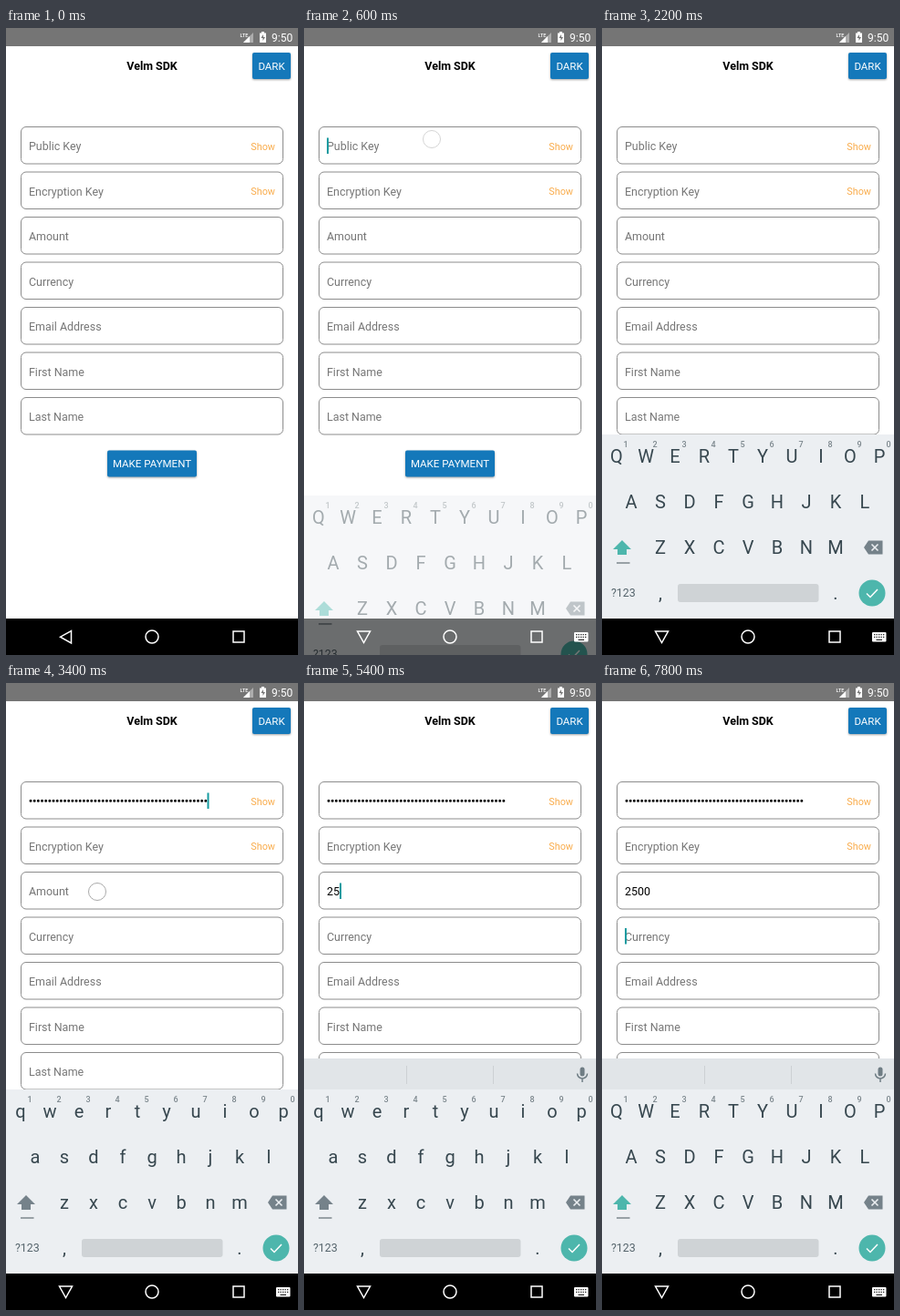
Recreate the animation shown at these times as an HTML page. Size 320 by 688 pixels, loop 8000 ms.

```html
<!DOCTYPE html>
<html lang="en">
<head>
<meta charset="utf-8">
<title>Payment form</title>
<style>
  html, body { margin: 0; width: 100%; height: 100%; overflow: hidden; background: #fff; }
  svg { display: block; width: 320px; height: 688px; font-family: Roboto, "Noto Sans", sans-serif; font-size: 12.44px; }
  .mid { text-anchor: middle; }
  .box { fill: #fff; stroke: #8c8c8c; }
  .hint { fill: #777; }
  .show { fill: #f9ac4c; font-size: 10.8px; text-anchor: end; }
  .button rect { fill: #1478ba; filter: drop-shadow(0 1px 1px rgba(0, 0, 0, .35)); }
  .button text { fill: #fff; font-size: 11.5px; }
  .letter { fill: #37474f; font-size: 20px; }
  .digit { fill: #7c878d; font-size: 9px; font-weight: 500; }
  .line { fill: none; stroke: #fff; stroke-width: 1.5; }
</style>
</head>
<body>
<svg id="stage" viewBox="0 0 320 688"></svg>
<script>
const LOOP = 8000, STEP = 200, BLINK = 500;
const ROW_TOP = 108.5, ROW_GAP = 49.5;
const labels = ["Public Key", "Encryption Key", "Amount", "Currency", "Email Address", "First Name", "Last Name"];
const keyRows = [["QWERTYUIOP", 16, 477], ["ASDFGHJKL", 32, 527], ["ZXCVBNM", 64, 577]];

// Each state holds from `at` on; the caret blinks from `blink`.
const states = [
  { at: 0, focus: -1, caps: true },
  { at: 600, focus: 0, caps: true, blink: 600 },
  { at: 2400, focus: 0, key: true, blink: 2300 },
  { at: 3600, focus: 2, key: true, strip: true, caps: true, blink: 3700 },
  { at: 5000, focus: 2, key: true, strip: true, amount: "2", blink: 5000 },
  { at: 5400, focus: 2, key: true, strip: true, amount: "25", blink: 5400 },
  { at: 6200, focus: 2, key: true, strip: true, amount: "250", blink: 6200 },
  { at: 6400, focus: 2, key: true, strip: true, amount: "2500", blink: 6400 },
  { at: 7600, focus: 3, key: true, strip: true, amount: "2500", caps: true, blink: 7600 }
];
const touches = [
  { from: 400, fade: 400, to: 800, x: 140, y: 122 },
  { from: 3400, fade: 450, to: 4800, x: 100, y: 229 },
  { from: 7400, fade: 300, to: 7800, x: 100, y: 278 }
];

const text = (x, y, str, cls = "", extra = "") => `<text x="${x}" y="${y}" class="${cls}" ${extra}>${str}</text>`;
const rect = (x, y, w, h, extra = "") => `<rect x="${x}" y="${y}" width="${w}" height="${h}" ${extra}/>`;
const path = (d, extra = "") => `<path d="${d}" ${extra}/>`;
const button = (x, y, w, h, label) =>
  `<g class="button">${rect(x, y, w, h, 'rx="2"')}${text(x + w / 2, y + h / 2 + 4.2, label, "mid")}</g>`;
const rowY = i => ROW_TOP + ROW_GAP * i;

function statusBar() {
  return rect(0, 0, 320, 20, 'fill="#757575"') +
    `<g fill="#fff">${text(256.5, 9.5, "LTE", "", 'font-size="5.5" font-weight="500"')}` +
    path("M271 5V16H260Z", 'opacity=".4"') + path("M267 9V16H260Z") +
    path("M278 5.5h2v-1.5h3v1.5h2v10.5h-7z") +
    path("M282 7l-2.5 4h2v3l2.500-4h-2z", 'fill="#757575"') +
    text(291, 14.5, "9:50", "", 'font-size="12"') + "</g>";
}

function form() {
  const rows = labels.map((label, i) =>
    rect(16.5, rowY(i), 287, 40.5, 'rx="5.5" class="box"') +
    text(25, rowY(i) + 25.5, label, "hint", `id="hint${i}"`) +
    (i < 2 ? text(295, rowY(i) + 25, "Show", "show") : "")).join("");
  return text(160, 46, "Velm SDK", "mid", 'font-weight="700"') +
    button(270, 27, 42, 29, "DARK") + rows + button(111, 463.5, 98, 29, "MAKE PAYMENT") +
    path("M27 129.3H219.2", 'id="dots" fill="none" stroke="#000" stroke-width="3" stroke-linecap="round" stroke-dasharray="0 4.17"') +
    text(25, rowY(2) + 25, "", "", 'id="amount"') +
    rect(25, 0, 2, 17.5, 'id="caret" fill="#159ba0"') +
    '<circle id="touch" r="9.5" fill="#fff" fill-opacity=".5" stroke="#aaa"/>';
}

function keyboard() {
  let out = `<g id="strip">${rect(0, 412, 320, 35, 'fill="#e1e5e8"')}` +
    path("M112.5 420v20M207.500 420v20", 'stroke="#ccd1d4"') +
    rect(302.5, 421.5, 5, 10, 'rx="2.5" fill="#6f7d84"') +
    path("M299.5 428.500a5.500 5.500 0 0 0 11 0M305 434v4", 'fill="none" stroke="#6f7d84" stroke-width="1.5"') + "</g>" +
    rect(0, 446, 320, 202, 'fill="#eceff2"');
  for (const [keys, x, y] of keyRows)
    out += [...keys].map((key, i) => text(x + 32 * i, y, key, "letter mid")).join("");
  for (let i = 0; i < 10; i++) out += text(26 + 32 * i, 460, (i + 1) % 10, "digit mid");
  return out +
    path("M22 562L32 572H27V578H17V572H12Z", 'id="shift"') +
    path("M16 587h14.500", 'stroke="#7c878d" stroke-width="1.5"') +
    path("M287 570l5-7.500h15.500v15H292z", 'fill="#75828a"') +
    path("M295.500 566.500l7 7m0-7l-7 7", 'stroke="#eceff2" stroke-width="1.6"') +
    text(10, 624, "?123", "", 'fill="#53626a" font-size="12.4"') +
    text(64, 627, ",", "letter mid") + text(256, 627, ".", "letter mid") +
    rect(83, 610, 154.5, 20, 'rx="3" fill="#cfd3d6"') +
    '<circle cx="296" cy="620" r="14.500" fill="#4db6ac"/>' +
    path("M290 620.500l4 4 8-8.500", 'class="line"');
}

function navIcons() {
  return path("", 'id="back" class="line"') + '<circle cx="160" cy="668" r="7" class="line"/>' +
    rect(249, 662, 12, 12, 'class="line"') +
    `<g id="imeIcon">${rect(296, 663, 15.5, 10.5, 'rx="1" fill="#fff"')}` +
    path("M298 665.700h12M298 668.300h12", 'stroke="#222" stroke-width="1.2" stroke-dasharray="1.3 1.2"') +
    path("M300.500 671.300h6.500", 'stroke="#222" stroke-width="1.2"') + "</g>";
}

const stage = document.getElementById("stage");
stage.innerHTML = rect(0, 0, 320, 688, 'fill="#fff"') + form() + statusBar() +
  rect(0, 648, 320, 40) + `<g id="keyboard">${keyboard()}</g>` + navIcons();

const el = id => document.getElementById(id);
const letters = [...stage.querySelectorAll(".letter")];
const set = (id, attrs) => { for (const k in attrs) el(id).setAttribute(k, attrs[k]); };
const show = (id, on) => set(id, { visibility: on ? "visible" : "hidden" });

function draw(t) {
  const s = states.filter(state => state.at <= t).pop();
  const amount = s.amount || "";
  const open = s.focus >= 0;

  show("hint0", !s.key);
  show("dots", s.key);
  show("hint2", !amount);
  el("amount").textContent = amount;

  const caretOn = open && Math.floor(Math.max(0, t - s.blink) / BLINK) % 2 === 0;
  show("caret", caretOn);
  if (caretOn) {
    const x = s.focus === 0 && s.key ? 220.5 : s.focus === 2 ? 25 + amount.length * 7 : 25;
    set("caret", { x, y: rowY(s.focus) + 12 });
  }

  const touch = touches.find(p => t >= p.from && t < p.to);
  show("touch", touch);
  if (touch) set("touch", { cx: touch.x, cy: touch.y, opacity: Math.max(.15, 1 - (t - touch.from) / touch.fade) });

  const slide = Math.min(1, Math.max(0, (t - 500) / 220));
  set("keyboard", { opacity: slide, transform: `translate(0 ${225 * (1 - slide) ** 2})` });
  show("strip", s.strip);
  set("shift", { fill: s.caps ? "#4db6ac" : "#75828a" });
  for (const node of letters)
    node.textContent = s.caps ? node.textContent.toUpperCase() : node.textContent.toLowerCase();

  set("back", { d: open ? "M58.500 662H72.500L65.500 674.500Z" : "M71.500 661.500V675L59.500 668.200Z" });
  show("imeIcon", open);
}

function tick() {
  draw(Math.floor(performance.now() % LOOP / STEP) * STEP);
  requestAnimationFrame(tick);
}
tick();
</script>
</body>
</html>
```
